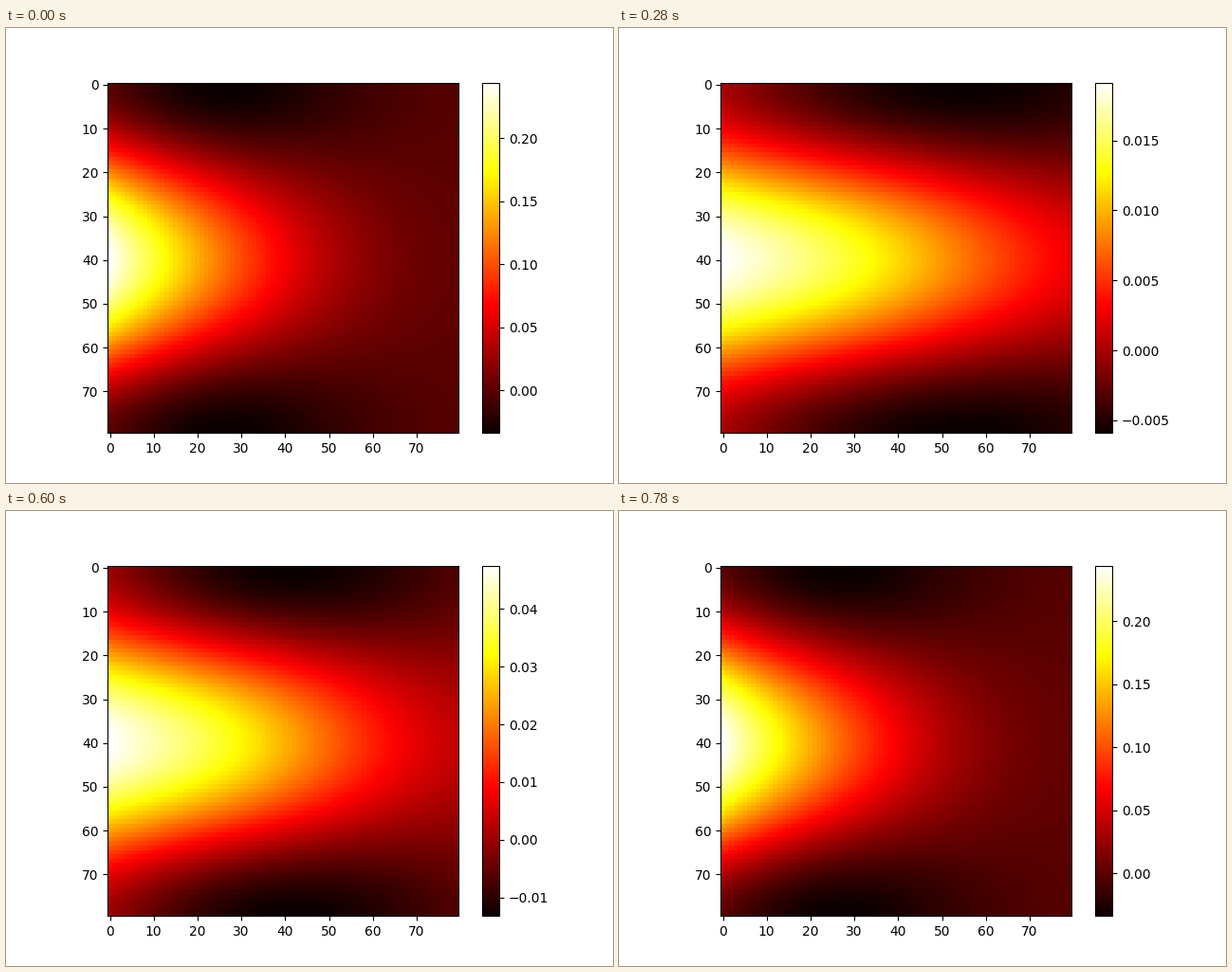
Recreate the animation shown at these times as a matplotlib script. Size 640 by 480 pixels, loop 0.8 s.

```python
import numpy as np
import matplotlib.pyplot as plt
from matplotlib.animation import FuncAnimation

SIZE = 80
STEPS = 20


def field(n):
    """Decaying wave that spreads to the right as n grows."""
    x = np.arange(SIZE)
    rise = 1 / (1 + np.exp((6.74 - n) / 1.5))

    # Profile along the centre line: exponential decay behind a moving front.
    decay = 38 + 73 * rise
    front = 59 + .075 * n ** 2
    ridge = np.exp(-x / decay - (x / front) ** 3)

    # Profile along the top and bottom edges: one negative dip moving right.
    s = x / (27 + n + .07 * n ** 2)
    trough = -(.136 + .174 * rise) * s * np.exp((1 - s ** 2) / 2)

    wave = np.cos(2 * np.pi * (x - SIZE / 2) / SIZE)[:, None]
    peak = .244 * np.exp(-.1818 * n)
    return peak * ((ridge + trough) / 2 + (ridge - trough) / 2 * wave)


fig, ax = plt.subplots(figsize=(6.4, 4.8), dpi=100)
image = ax.imshow(field(0), cmap="hot", interpolation="nearest")
fig.colorbar(image, ax=ax)


def update(frame):
    # Forward, then back through the same states.
    z = field(min(frame, 2 * STEPS - 1 - frame))
    image.set_data(z)
    image.set_clim(z.min(), z.max())
    return [image]


anim = FuncAnimation(fig, update, frames=2 * STEPS, interval=20,
                     repeat=True, repeat_delay=0, blit=False)
plt.show()
```
